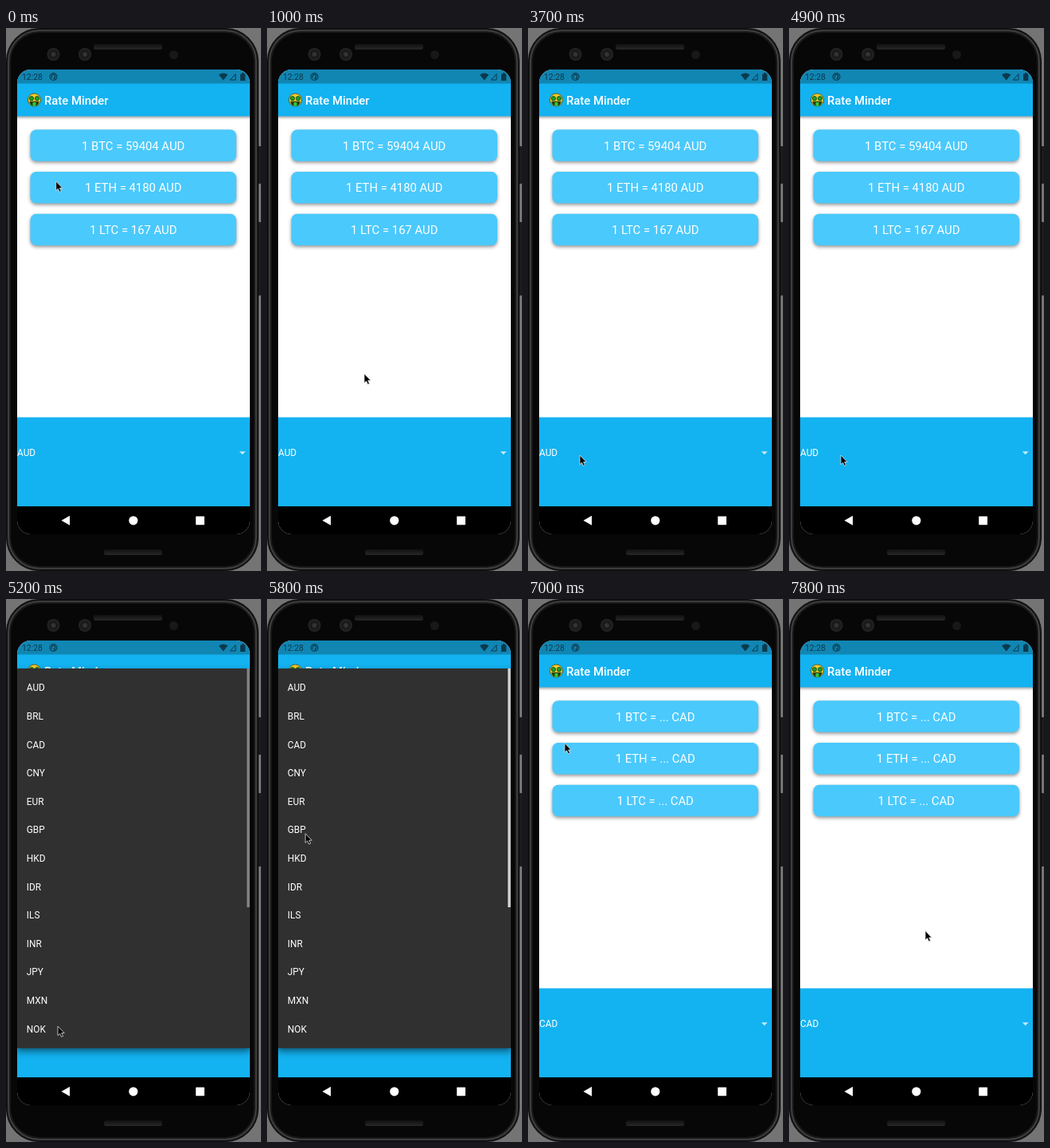
These frames come from a looping animation (320 by 680 pixels, 8000 ms). An HTML page:

```html
<!DOCTYPE html>
<html lang="en">
<head>
<meta charset="utf-8">
<title>Rate Minder</title>
<style>
  html, body { margin: 0; width: 100%; height: 100%; overflow: hidden; background: #747474; }
  svg { display: block; width: 320px; height: 680px; }
  text { font-family: Roboto, "Liberation Sans", sans-serif; fill: #fff; font-size: 11.87px; }
  .title { font-size: 14.85px; font-weight: 500; }
  .rate { font-size: 14.85px; text-anchor: middle; }
  .clock { font-size: 10.4px; fill: #0b3a4e; }
  .card { fill: #4ac9fc; filter: drop-shadow(0 2px 2px rgba(0, 0, 0, .42)); }
  .bar { fill: #13b2f0; }
  .appbar { filter: drop-shadow(0 2px 1.5px rgba(0, 0, 0, .35)); }
  .sheet { fill: #303030; filter: drop-shadow(0 4px 4px rgba(0, 0, 0, .5)); }
  .dark { fill: #0b3a4e; }
  .line { fill: none; stroke: #0b3a4e; }
</style>
</head>
<body>
<svg viewBox="0 0 320 680">
  <defs>
    <clipPath id="screen"><rect x="14" y="52" width="292" height="582" rx="17"/></clipPath>
    <linearGradient id="slot" x2="0" y2="1">
      <stop stop-color="#111"/><stop offset="1" stop-color="#272727"/>
    </linearGradient>
    <radialGradient id="lens">
      <stop offset=".2" stop-color="#353535"/><stop offset=".5" stop-color="#171717"/>
      <stop offset="1" stop-color="#262626"/>
    </radialGradient>
  </defs>

  <!-- phone body -->
  <rect x="314" y="148" width="6" height="47" rx="1" fill="#1b1b1b"/>
  <rect x="314" y="243" width="6" height="92" rx="1" fill="#1b1b1b"/>
  <rect x=".5" y=".5" width="316" height="679" rx="41" fill="#191919" stroke="#0b0b0b"/>
  <rect x="3.2" y="3.2" width="310.6" height="673.6" rx="38.5" fill="none" stroke="#454545" stroke-width="1.6"/>
  <rect x="6" y="6" width="305" height="668" rx="36" fill="#070707"/>
  <rect x="110" y="20" width="86" height="7" rx="2.5" fill="url(#slot)"/>
  <rect x="123" y="653" width="73" height="7" rx="2.5" fill="url(#slot)"/>
  <circle cx="59.5" cy="33" r="8" fill="url(#lens)"/>
  <circle cx="99" cy="33" r="8" fill="url(#lens)"/>
  <circle cx="210.5" cy="33.5" r="5.5" fill="#181818"/>

  <g clip-path="url(#screen)">
    <rect x="14" y="52" width="292" height="582" fill="#fff"/>

    <!-- app bar -->
    <rect class="bar appbar" x="10" y="60" width="300" height="50.5"/>
    <circle cx="35.5" cy="90" r="8" fill="#f2c92e" stroke="#4a4a12" stroke-width=".8"/>
    <g fill="#17a32c" stroke="#123f12" stroke-width=".8">
      <circle cx="32" cy="88.2" r="2.6"/>
      <circle cx="39" cy="88.2" r="2.6"/>
      <path d="M29.8 92.2H41.2Q40 97.6 35.5 97.6T29.8 92.2Z" fill="#26330f"/>
      <rect x="33.4" y="93" width="4.2" height="5" rx="1" stroke="none" fill="#30c243"/>
    </g>
    <text class="title" x="48" y="95.8">Rate Minder</text>

    <!-- status bar -->
    <rect x="14" y="52" width="292" height="17.5" fill="#1186b3"/>
    <text class="clock" x="20" y="65">12:28</text>
    <circle class="line" cx="59.5" cy="61" r="4.4" stroke-width="1.2"/>
    <path class="line" d="M57.3 63V60.5A2.2 2.2 0 1 1 59.5 62.8L62.6 64.4" stroke-width="1.1"/>
    <path class="dark" d="M267 58.6Q272.7 54.4 278.4 58.6L272.7 65.5Z"/>
    <path class="line" d="M281.3 65L288 57.6V65Z"/>
    <path class="dark" d="M294 57.5H296V56H298.5V57.5H300.3V66H294Z"/>

    <g id="cards"></g>

    <!-- currency picker -->
    <rect class="bar" x="14" y="487.5" width="292" height="112"/>
    <text id="picked" x="14" y="536.2"></text>
    <path d="M292.8 530.3H300.6L296.7 534.2Z" fill="#c5eafa"/>

    <!-- open menu -->
    <g id="menu">
      <rect class="sheet" x="13.5" y="87" width="293" height="475.5" rx="1.5"/>
      <rect id="thumb" x="302.3" y="87" width="3.4" height="299" fill="#d4d4d4"/>
    </g>

    <!-- navigation bar -->
    <rect x="14" y="599" width="292" height="35"/>
    <g fill="#fff">
      <path d="M69.5 616.8L80 610.8V622.8Z"/>
      <circle cx="159.8" cy="616.8" r="5.6"/>
      <rect x="238.2" y="611.6" width="10.8" height="10.6" rx=".6"/>
    </g>
  </g>

  <path id="cursor" d="M0 0V11.6L2.6 9.2L4.5 13.3L6.6 12.4L4.7 8.5H8.2Z"
        stroke="#e4e4e4" stroke-width=".8" stroke-linejoin="round"/>
</svg>

<script>
  const LOOP = 8000, STEP = 100, OPEN = 5200, CLOSE = 7000;
  const rates = { BTC: 59404, ETH: 4180, LTC: 167 };
  const currencies = "AUD BRL CAD CNY EUR GBP HKD IDR ILS INR JPY MXN NOK".split(" ");

  // pointer stops: time, x, y
  const stops = [
    [0, 62.7, 192], [900, 122, 432], [1000, 122, 433], [2800, 122, 433],
    [2900, 123, 461], [3000, 142, 510], [3100, 150, 556], [3200, 122, 574],
    [3300, 80, 560], [3400, 61, 539], [3600, 61, 539], [3700, 65, 535],
    [4600, 65, 535], [4700, 74, 535], [4800, 74, 535], [4900, 65, 535],
    [5200, 65, 535], [6000, 45, 249], [6400, 46, 180.5], [7000, 46, 180.5],
    [7800, 171, 415.5], [8000, 171, 415.5]
  ];

  const $ = id => document.getElementById(id);
  const add = (parent, tag, attrs, label = "") => {
    const el = document.createElementNS("http://www.w3.org/2000/svg", tag);
    for (const key in attrs) el.setAttribute(key, attrs[key]);
    el.textContent = label;
    return parent.appendChild(el);
  };

  const labels = Object.keys(rates).map((coin, i) => {
    const y = 127.3 + i * 52.7;
    add($("cards"), "rect", { class: "card", x: 30.5, y, width: 258.5, height: 39.5, rx: 7.5 });
    return add($("cards"), "text", { class: "rate", x: 159.7, y: y + 25.4 });
  });
  currencies.forEach((name, i) =>
    add($("menu"), "text", { x: 25.8, y: 115.3 + i * 35.6 }, name));

  const smooth = p => p * p * (3 - 2 * p);

  function pointer(t) {
    const i = stops.findIndex(s => s[0] > t);
    const [t0, x0, y0] = stops[i - 1], [t1, x1, y1] = stops[i];
    const p = smooth((t - t0) / (t1 - t0));
    return [x0 + (x1 - x0) * p, y0 + (y1 - y0) * p];
  }

  let shown;
  function setCurrency(name) {
    if (name === shown) return;
    shown = name;
    $("picked").textContent = name;
    Object.entries(rates).forEach(([coin, rate], i) => {
      labels[i].textContent = `1 ${coin} = ${name === "AUD" ? rate : "..."} ${name}`;
    });
  }

  function draw(t) {
    setCurrency(t < CLOSE ? "AUD" : "CAD");
    $("menu").style.display = t >= OPEN && t < CLOSE ? "" : "none";
    $("thumb").style.opacity = Math.min(1, .52 + Math.max(0, t - OPEN) / 400);
    $("cursor").setAttribute("transform", `translate(${pointer(t)})`);
  }

  const start = performance.now();
  function tick() {
    const t = (performance.now() - start) % LOOP;
    draw(Math.floor(t / STEP) * STEP);
    requestAnimationFrame(tick);
  }
  tick();
</script>
</body>
</html>
```
